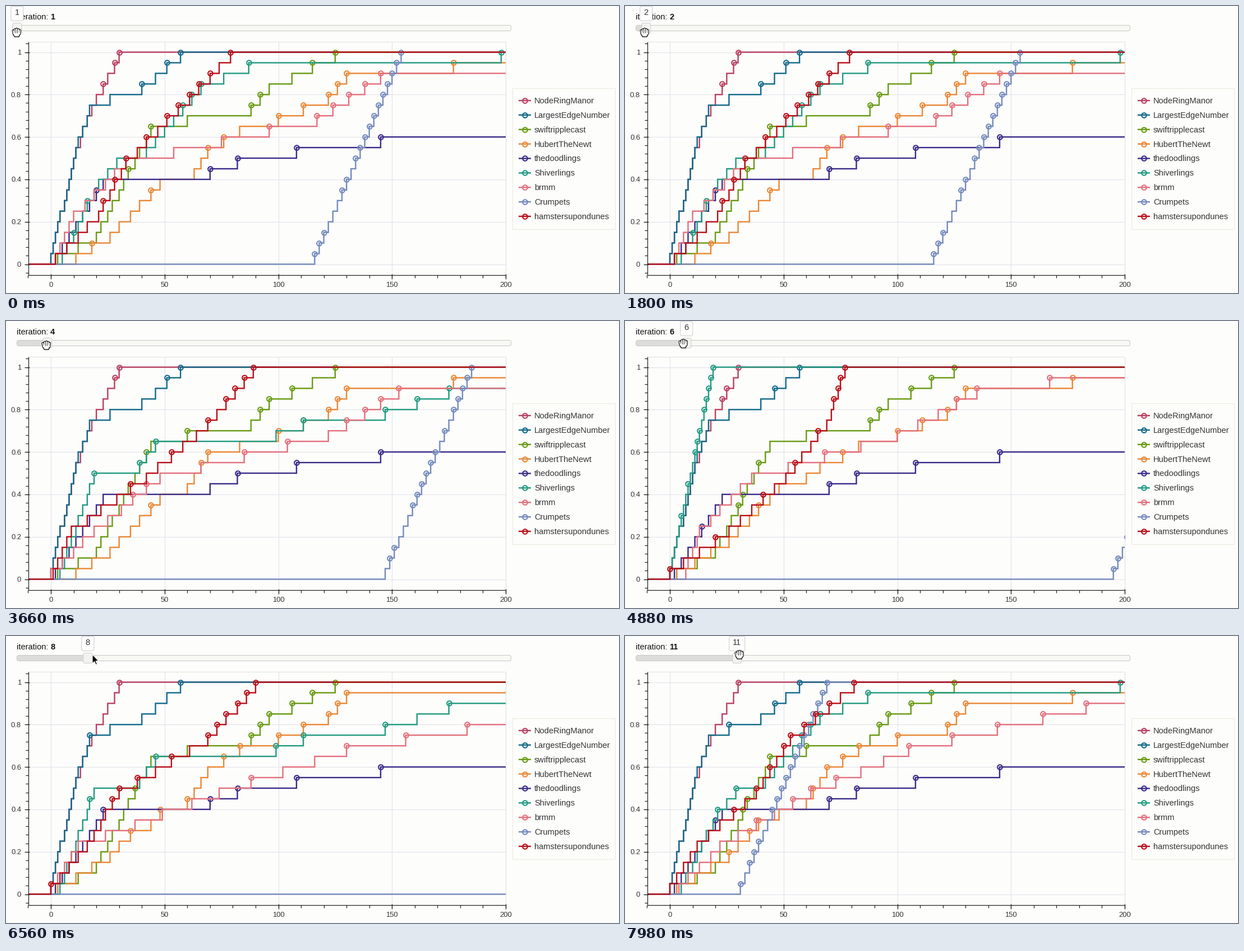
Write a matplotlib script that moves like this. It is 1093 px wide and 513 px high and loops after 8000 ms.

```python
import numpy as np
import matplotlib.pyplot as plt
from matplotlib.animation import FuncAnimation
from matplotlib.patches import FancyBboxPatch, Polygon, Rectangle

W, H, DPI = 1093, 513, 64
LEFT, RIGHT, TOP, BOTTOM = 39.5, 891, 63.5, 481
BG, INK = "#fdfdfc", "#333333"

# Name, colour, and how strongly the circled points crowd towards the top
SERIES = [
    ("NodeRingManor", "#b93f60", 12),
    ("LargestEdgeNumber", "#12698a", 8),
    ("swiftripplecast", "#689a12", 1.5),
    ("HubertTheNewt", "#ea8735", 1.3),
    ("thedoodlings", "#3a2a88", 2),
    ("Shiverlings", "#209a80", 1.6),
    ("brmm", "#e26f7b", 1.8),
    ("Crumpets", "#748abd", 0.2),
    ("hamstersupondunes", "#b90e17", 1.2),
]


def climb(*knots):
    """Times of each 0.05 step, eased between (step number, time) knots."""
    level, time = zip(*knots)
    return np.round(np.interp(np.arange(1, level[-1] + 1), level, time))


MANOR = climb((1, 0), (11, 11), (15, 18), (20, 30))
EDGE = climb((1, 0), (11, 11), (15, 17), (16, 26), (17, 40), (20, 57))
RIPPLE = climb((1, 3), (3, 20), (13, 44), (14, 60), (15, 88), (17, 96), (20, 125))
NEWT = climb((1, 3), (2, 11), (4, 26), (9, 48), (10, 60), (13, 69), (15, 83),
             (16, 100), (18, 122), (20, 130), (21, 177))
DOODLE = climb((1, 2), (8, 23), (9, 70), (10, 82), (11, 108), (12, 145))
FAST = climb((1, 0), (20, 19))
STEADY = climb((1, 5), (8, 21), (10, 29), (11, 42), (17, 66), (19, 87), (20, 198))
SLOW = climb((1, 4), (10, 19), (11, 39), (13, 46), (14, 99), (15, 111),
             (16, 147), (18, 175))


def make_run(seed, skipped, shiver, start, brmm, dunes):
    wave = [] if start is None else start + 2 * np.arange(20)
    all_steps = [MANOR, EDGE, RIPPLE, np.delete(NEWT, skipped), DOODLE, shiver,
                 climb(*zip((1, 5, 10, 14, 18, 19), brmm)), wave,
                 climb(*zip((1, 5, 10, 15, 20), dunes))]
    rng = np.random.default_rng(seed)
    run = []
    for steps, (_, _, power) in zip(all_steps, SERIES):
        n = len(steps)
        chance = (np.arange(1, n + 1) / max(n, 1)) ** power
        run.append((np.asarray(steps, float), rng.random(n) < chance))
    return run


RUNS = {
    1: make_run(1, (0, 9), STEADY, 116, (2, 10, 33, 117, 145), (2, 21, 33, 56, 79)),
    3: make_run(3, (19, 20), SLOW, None, (0, 14, 74, 128, 153, 167), (5, 31, 45, 66, 89)),
    4: make_run(4, (0, 13), SLOW, 147, (0, 19, 48, 122, 153), (1, 9, 42, 69, 89)),
    6: make_run(6, (10, 12), FAST, 195, (7, 13, 36, 100, 135, 167), (0, 26, 51, 69, 77)),
    8: make_run(8, (6, 20), SLOW, None, (0, 12, 74, 130, 236), (0, 16, 30, 69, 90)),
    11: make_run(11, (7, 16), STEADY, 31, (4, 22, 62, 105, 183), (0, 12, 38, 53, 81)),
}
# The remaining iterations alternate between the curves of two other runs.
RUNS[2] = RUNS[1]
for n, (a, b) in {5: (4, 6), 7: (6, 8), 9: (8, 11), 10: (11, 8)}.items():
    RUNS[n] = [RUNS[b if i % 2 else a][i] for i in range(len(SERIES))]


def px(v):
    return v * 72 / DPI


def sx(x):
    return 80 + 4.055 * np.asarray(x, float)


def sy(y):
    return 461.5 - 379 * np.asarray(y, float)


fig = plt.figure(figsize=(W / DPI, H / DPI), dpi=DPI, facecolor=BG)
ax = fig.add_axes([0, 0, 1, 1])
ax.set_xlim(0, W)
ax.set_ylim(H, 0)
ax.axis("off")


def text(x, y, s, size, color=INK, **kw):
    return ax.text(x, y, s, fontsize=px(size), color=color,
                   family="Liberation Sans", va="baseline", **kw)


def segments(pairs, color, width, z):
    xs, ys = [], []
    for x0, y0, x1, y1 in pairs:
        xs += [x0, x1, np.nan]
        ys += [y0, y1, np.nan]
    ax.plot(xs, ys, color=color, lw=px(width), zorder=z, solid_capstyle="butt")


def box(x, y, w, h, r, face, edge, z):
    patch = FancyBboxPatch((x, y), w, h, boxstyle=f"round,pad=0,rounding_size={r}",
                           fc=face, ec=edge, lw=px(1), zorder=z)
    return ax.add_patch(patch)


# Grid, frame and axes
xticks, yticks = range(0, 201, 50), np.arange(6) / 5
segments([(sx(v), TOP, sx(v), BOTTOM) for v in xticks]
         + [(LEFT, sy(v), RIGHT, sy(v)) for v in yticks], "#e4e4ec", 1.2, 1)
segments([(LEFT, TOP, RIGHT, TOP), (RIGHT, TOP, RIGHT, BOTTOM)], "#e6e6e0", 1.2, 1)
segments([(LEFT, TOP, LEFT, BOTTOM), (LEFT, BOTTOM, RIGHT, BOTTOM)]
         + [(sx(v), BOTTOM - 2, sx(v), BOTTOM + 6.5) for v in xticks]
         + [(sx(v), BOTTOM, sx(v), BOTTOM + 4.5) for v in range(-10, 201, 10)]
         + [(LEFT - 6.5, sy(v), LEFT + 2, sy(v)) for v in yticks]
         + [(LEFT - 4.5, sy(v), LEFT, sy(v)) for v in np.arange(-1, 27) / 25],
         "#1c1c1c", 1.2, 40)
for v in xticks:
    text(sx(v), 502.5, str(v), 13, ha="center")
for v in yticks:
    text(27, sy(v) + 4.6, f"{v:g}", 13, ha="right")

# Curves and legend
clip = Rectangle((LEFT, TOP), RIGHT - LEFT, BOTTOM - TOP, transform=ax.transData)
ax.add_patch(Rectangle((902.5, 146.5), 183, 252, fc=BG, ec="#ebebe0", lw=px(1.2)))
stroke = dict(lw=px(2.4), solid_joinstyle="miter", solid_capstyle="butt", snap=False)
ring = dict(marker="o", ms=px(8.6), mfc="none", mew=px(2.1))
curves = []
for i, (name, color, _) in enumerate(SERIES):
    line, = ax.plot([], [], color=color, drawstyle="steps-post", zorder=5 + i, **stroke)
    dots, = ax.plot([], [], ls="", mec=color, zorder=5.5 + i, snap=False, **ring)
    for art in (line, dots):
        art.set_clip_path(clip)
    curves.append((line, dots))
    y = 169 + 25.87 * i
    ax.plot([914, 925, 936], [y] * 3, color=color, markevery=[1], mec=color,
            zorder=5, **stroke, **ring)
    text(942, y + 5, name, 14.6)

# Slider
text(19, 24, "iteration:", 14.6, "#111111")
number = text(79, 24, "", 14.6, "#111111", weight="bold")
box(19.5, 34.5, 881, 10, 3.5, "#f8f8f4", "#c6c6c2", 50)
filled = box(20, 35, 1, 9, 3, "#dcdcda", "none", 51)
handle = box(0, 30.5, 16, 18, 3, "#f3f3f2", "#cccccc", 52)
tip = box(0, 0.5, 22, 26, 3, "#fefefe", "#cccccc", 53)
tip_text = text(0, 15.5, "", 14.6, ha="center", zorder=54)

# Cursors, as offsets from the pointer position
FIST = [(-6.2, -3, -5, 3), (-3, -5.5, -3, 2), (0, -6.2, 0, 2),
        (3, -5.5, 3, 2), (5.8, -3.5, 5.2, 3)]
PALM = np.array([(-6, 1), (6, 1), (5.4, 4), (4, 8), (-3.6, 8), (-6, 4)])
ARROW = np.array([(0, 0), (0, 16.2), (3.7, 12.7), (6.2, 18.4), (8.6, 17.4),
                  (6.2, 11.7), (11.3, 11.7)])
fingers = []
for color, width, z in (("black", 4.4, 60), ("white", 2.2, 62)):
    for f in FIST:
        art, = ax.plot([], [], color=color, lw=px(width), zorder=z,
                       solid_capstyle="round")
        fingers.append((art, np.array(f)))
palm = ax.add_patch(Polygon(PALM, fc="white", ec="black", lw=px(1.3), zorder=61))
arrow = ax.add_patch(Polygon(ARROW, fc="black", ec="white", lw=px(1.2), zorder=63))

# Pointer path: step, x, y
PATH = np.array([(0, 19, 47), (18, 20, 47), (38, 35, 47), (79, 72, 43),
                 (140, 150, 36), (171, 204, 33)]).T


def show_run(n):
    for (line, dots), (steps, marked) in zip(curves, RUNS[n]):
        levels = np.arange(len(steps) + 1) / 20
        line.set_data(sx([-10, *steps, max([200, *steps])]),
                      sy([*levels, levels[-1]]))
        dots.set_data(sx(steps[marked]), sy(levels[1:][marked]))


def draw(frame):
    # The picture moves in bursts: two short steps and one long one per 140 ms.
    cycle, rest = divmod(frame * 20, 140)
    step = 3 * cycle + (rest >= 20) + (rest >= 120)
    x, y = (np.interp(step, PATH[0], p) for p in PATH[1:])
    n = 1 + int((x - 20) / 18 + 0.5)
    show_run(n)

    pos = 19.8 + 18 * (n - 1)
    wide = 22 if n < 10 else 28
    number.set_text(str(n))
    filled.set_width(max(pos - 20, 1))
    handle.set_x(pos - 8)
    tip.set_x(pos - wide / 2)
    tip.set_width(wide)
    tip_text.set_text(str(n))
    tip_text.set_x(pos)
    hovering = not 77 <= step <= 81
    tip.set_visible(hovering)
    tip_text.set_visible(hovering)

    pointing = 138 <= step <= 143
    arrow.set_visible(pointing)
    arrow.set_xy(ARROW + (x + 4, y - 3))
    palm.set_visible(not pointing)
    palm.set_xy(PALM + (x, y))
    for art, f in fingers:
        art.set_visible(not pointing)
        art.set_data(x + f[::2], y + f[1::2])
    return []


anim = FuncAnimation(fig, draw, frames=400, interval=20, repeat=True,
                     repeat_delay=0, init_func=lambda: draw(0))
plt.show()
```
